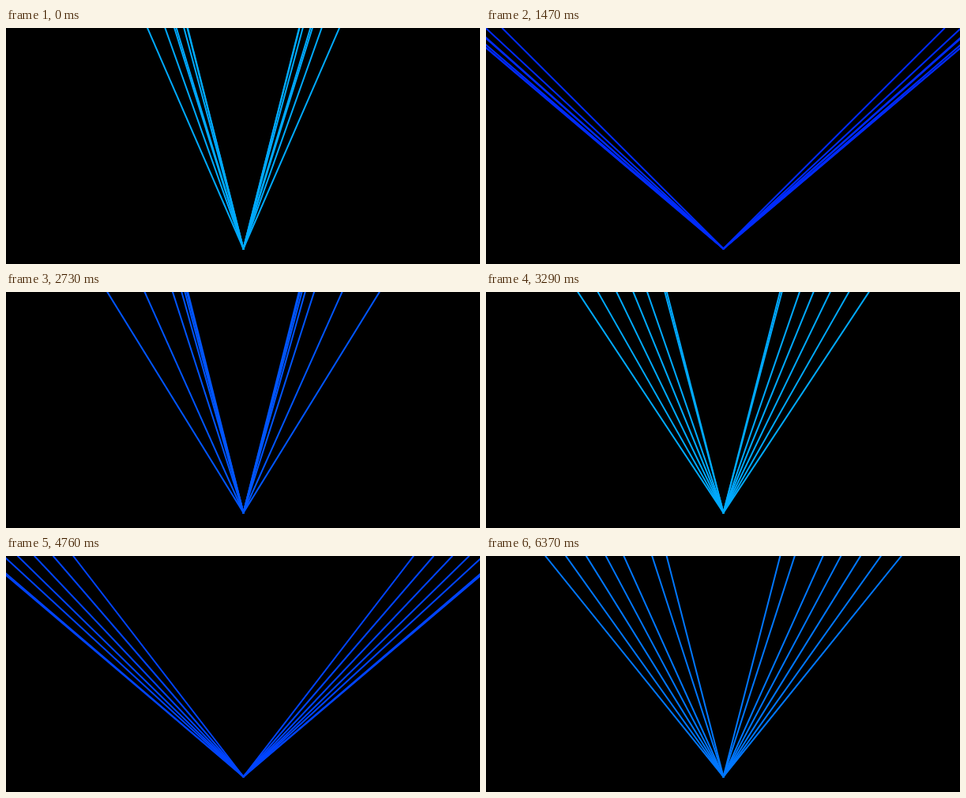
Animation of 600x300 px, one loop 6.44 s. Source, as an HTML page with a canvas:

```html
<!DOCTYPE html>
<html lang="en">
<head>
<meta charset="utf-8">
<title>Beam fan</title>
<style>
  html, body { margin: 0; width: 100%; height: 100%; overflow: hidden; background: #000; }
  canvas { display: block; width: 100vw; height: 100vh; }
</style>
</head>
<body>
<canvas width="600" height="300"></canvas>
<script>
const ctx = document.querySelector('canvas').getContext('2d');
const STEP_MS = 70, STEPS = 92;
// Beams run between pixel centres
const APEX = { x: 300.5, y: 280.5 }, TOP = 0.5;
const LAGS = [0, 0.2, 0.4, 0.6, 0.8, 1.2, 1.6];

// [step, green level] pairs; blue is always full
const GREEN = [[0, 170], [11, 85], [31, 0], [47, 170], [68, 68], [77, 102], [91, 119]];

function greenAt(step) {
  const i = GREEN.findIndex(([s]) => s >= step);
  if (i === 0) return GREEN[0][1];
  const [s0, g0] = GREEN[i - 1], [s1, g1] = GREEN[i];
  return Math.round(g0 + (g1 - g0) * (step - s0) / (s1 - s0));
}

function draw(step) {
  const phase = 0.68 + 0.15 * step;
  ctx.fillStyle = '#000';
  ctx.fillRect(0, 0, 600, 300);
  ctx.strokeStyle = `rgb(0, ${greenAt(step)}, 255)`;
  ctx.lineWidth = 2;
  ctx.lineCap = 'square';
  for (const lag of LAGS) {
    const spread = 200 - 130 * Math.cos(phase - lag);
    for (const side of [-1, 1]) {
      ctx.beginPath();
      ctx.moveTo(APEX.x, APEX.y);
      ctx.lineTo(APEX.x + side * spread, TOP);
      ctx.stroke();
    }
  }
}

const start = performance.now();
function tick() {
  draw(Math.floor((performance.now() - start) / STEP_MS) % STEPS);
  requestAnimationFrame(tick);
}
tick();
</script>
</body>
</html>
```
